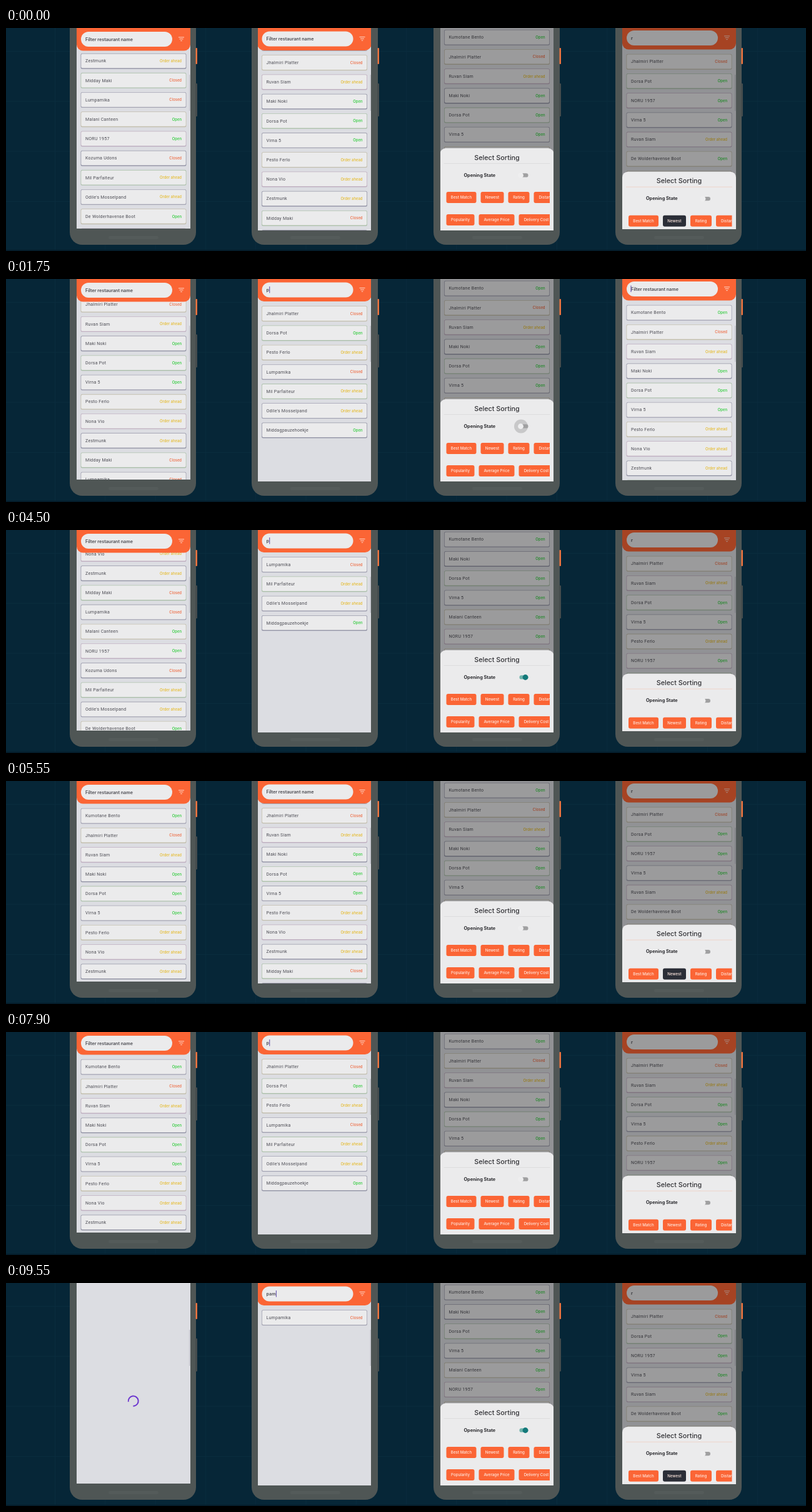
These frames come from a looping animation (1280 by 358 pixels, 9.6 s). An HTML page with a canvas:

```html
<!DOCTYPE html>
<html lang="en">
<head>
<meta charset="utf-8">
<title>Restaurant list: loading, filtering, sorting</title>
<style>
html, body { margin: 0; width: 100%; height: 100%; overflow: hidden; background: #062637; }
canvas { display: block; }
</style>
</head>
<body>
<canvas id="stage" width="1280" height="358"></canvas>
<script>
const ctx = document.getElementById('stage').getContext('2d');
const LOOP = 9600, PITCH = 31.2, TOP = 56;
const ORANGE = '#fb6535', PAPER = '#ebebec', SCREEN = '#dcdde2';
const STATES = {
  O: ['Open', '#2bcb38'],
  C: ['Closed', '#ee683f'],
  A: ['Order ahead', '#e5bb2e']
};
const EDGES = ['#a3a3b2', '#9697a8', '#c3bfae', '#afc2ae', '#c0b0c1'];

const places = `Kumotane Bento:O
Jhalmiri Platter:C
Ruvan Siam:A
Maki Noki:O
Dorsa Pot:O
Virna 5:O
Pesto Ferlo:A
Nona Vio:A
Zestmunk:A
Midday Maki:C
Lumpamika:C
Malani Canteen:O
NORU 1957:O
Kozuma Udons:C
Mil Parfaiteur:A
Odile's Mosselpand:A
De Wolderhavense Boot:O
Goza Grillzaal & Frietzaal:A
Middagpauzehoekje:O`.split('\n').map((line, id) => {
  const [name, state] = line.split(':');
  return { id, name, state };
});
const matching = q => places.filter(p => p.name.toLowerCase().includes(q));
const openFirst = [...places].sort((a, b) => (b.state === 'O') - (a.state === 'O'));
const newest = [1, 4, 12, 5, 2, 16, 6, 14, 17].map(i => places[i]);

function box(x, y, w, h, r, fill) {
  ctx.beginPath();
  ctx.roundRect(x, y, w, h, r);
  ctx.fillStyle = fill;
  ctx.fill();
}

function disc(x, y, r, fill) {
  box(x - r, y - r, 2 * r, 2 * r, r, fill);
}

function label(str, x, y, font, color, align = 'left', spacing = 0) {
  ctx.font = font + ', sans-serif';
  ctx.fillStyle = color;
  ctx.textAlign = align;
  ctx.textBaseline = 'middle';
  ctx.letterSpacing = spacing + 'px';
  ctx.fillText(str, x, y + .4);
}

function background() {
  box(0, 0, 1280, 358, 0, '#062637');
  for (let x = 78; x < 1280; x += 80.3) box(x, 0, 1, 358, 0, '#0a2c3e');
  for (let y = 37; y < 358; y += 80.3) box(0, y, 1280, 1, 0, '#0a2c3e');
  box(0, 356, 1280, 2, 0, '#041d2b');
}

function body(x) {
  box(x, -40, 202, 388, 20, '#4f5655');
  box(x + 201, 89, 3, 53, 1, '#454c4d');
  box(x + 201.5, 32, 2.5, 26, 1, '#ee743f');
  box(x + 62, 334, 80, 5, 2.5, '#545b5a');
}

function rows(list, scroll = 0) {
  list.forEach((p, i) => {
    const y = TOP + i * PITCH - scroll;
    if (y < -20 || y > 390) return;
    const edge = EDGES[p.id * 7 % 5];
    box(6.5, y - 12.2, 169, 25, 2.5, edge);
    box(7.3, y - 11.4, 167.4, 22.8, 2, PAPER);
    const [state, color] = STATES[p.state];
    label(p.name, 14, y, '7px Roboto', '#4b4b53', 'left', .28);
    label(state, 168, y, '500 5.9px Inter', color, 'right');
  });
}

function header(query, cursor) {
  box(0, -30, 182, 66.5, 10, ORANGE);
  box(7, 6, 146, 24, 12, PAPER);
  label(query || 'Filter restaurant name', 14, 18, '600 7.15px Inter', '#4a4a50');
  if (cursor) {
    const w = query ? ctx.measureText(query).width : -.8;
    box(14.3 + w, 12.5, 1, 10.5, 0, '#5a45a8');
  }
  [9, 6, 2.5].forEach((w, i) => box(167.5 - w / 2, 14.4 + i * 2.8, w, 1, 0, '#ffd9cc'));
}

function toggle(on, ripple) {
  if (ripple) disc(129.5, 43.5, 11, '#c8c8c9');
  box(127, 40.2, 14, 6.4, 3.2, on ? '#6fb3ac' : '#a0a0a1');
  disc(on ? 136.5 : 129, 43.5, 4.4, on ? '#14797a' : '#eeeeef');
}

function chips(line, y, active) {
  let x = 10;
  for (const [name, w] of line) {
    box(x, y, w, 18, 3, name === active ? '#2b2e37' : ORANGE);
    label(name, x + w / 2, y + 9, '500 6.2px Inter', '#ffe9e0', 'center');
    x += w + 7;
  }
}

function sheet(y, { on, ripple, active, line = '#d9d9da' }) {
  box(0, -60, 182, 500, 0, 'rgba(0,0,0,.34)');
  ctx.save();
  ctx.translate(0, y);
  box(0, 0, 182, 220, [9, 9, 0, 0], PAPER);
  label('Select Sorting', 91, 15, '500 10.8px Inter', '#333337', 'center');
  box(6, 24, 170, .8, 0, line);
  label('Opening State', 38, 43, '700 7.3px Inter', '#2c2c30');
  toggle(on, ripple);
  ctx.beginPath();
  ctx.rect(6, 60, 169.5, 90);
  ctx.clip();
  chips([['Best Match', 48], ['Newest', 37], ['Rating', 34], ['Distance', 42]], 70, active);
  chips([['Popularity', 45], ['Average Price', 57], ['Delivery Cost', 56]], 106, active);
  ctx.restore();
}

// Runs draw in display coordinates, clipped to the visible display.
function phone(k, x, bottom, dy, draw) {
  body(102 + 291 * k);
  ctx.save();
  ctx.beginPath();
  ctx.rect(Math.ceil(x), 0, 182 - (x % 1) * 2, bottom);
  ctx.clip();
  ctx.translate(x, dy);
  box(-1, -60, 190, 500, 0, SCREEN);
  draw();
  ctx.restore();
}

const scrollbar = dy => box(180, 75 - dy, 1.3, 58, 0, '#bfc0c8');
const blink = t => t >= 1350 && Math.floor((t - 1350) / 500) % 2 === 0;

function loadAndScroll(t) {
  const PERIOD = 2268, u = (t + PERIOD - 200) % PERIOD + 200;
  if (u < 1000) {
    const a = u / 160;
    ctx.beginPath();
    ctx.arc(90.7, 189.5, 8, a, a + 4.9);
    ctx.lineWidth = 2;
    ctx.strokeStyle = '#6c35cf';
    ctx.stroke();
  } else {
    const scroll = (Math.max(0, u - 1559) * .0993) ** 1.3;
    rows(places, Math.min(310, scroll));
    header('');
  }
  scrollbar(0);
}

function typed(u) {
  const steps = [[1500, ''], [2300, 'p'], [2800, 'pa'], [4150, 'pam'], [4400, 'pa'], [4900, 'p']];
  const step = steps.find(([end]) => u < end);
  return step ? step[1] : '';
}

function typeFilter(t) {
  const u = t % 6150;
  const kept = u >= 5050 || u < 120;
  rows(matching(typed(u - 150)), kept ? PITCH : 0);
  header(typed(u), u > 1300 && u < 4900 && blink(u));
  scrollbar(-.5);
}

function toggleOpen(t) {
  const u = t % 2450, on = u >= 1800;
  rows(on ? openFirst : places);
  sheet(234, { on, ripple: u >= 1680 && u < 1900 });
}

function sortNewest(t) {
  const sorted = t < 600 || t >= 5400 && t < 7300 || t >= 8800;
  const query = t >= 600 && t < 2600 ? '' : 'r';
  rows(sorted ? newest : matching(query));
  const open = t < 600 || t >= 3900;
  header(query, !open && blink(t));
  scrollbar(-2);
  if (open) {
    const left = t < 600 ? 0 : Math.max(0, 1 - (t - 3900) / 250);
    sheet(232.7 + 92 * left ** 3, { active: sorted && 'Newest', line: '#efcbbd' });
  }
}

function frame(now) {
  const t = now % LOOP;
  background();
  phone(0, 113, 322, 0, () => loadAndScroll(t));
  phone(1, 402.5, 325, -.5, () => typeFilter(t));
  phone(2, 694.5, 325, -41, () => toggleOpen(t));
  phone(3, 986, 323, -2, () => sortNewest(t));
  requestAnimationFrame(() => frame(performance.now() - start));
}

const start = performance.now();
frame(0);
</script>
</body>
</html>
```
